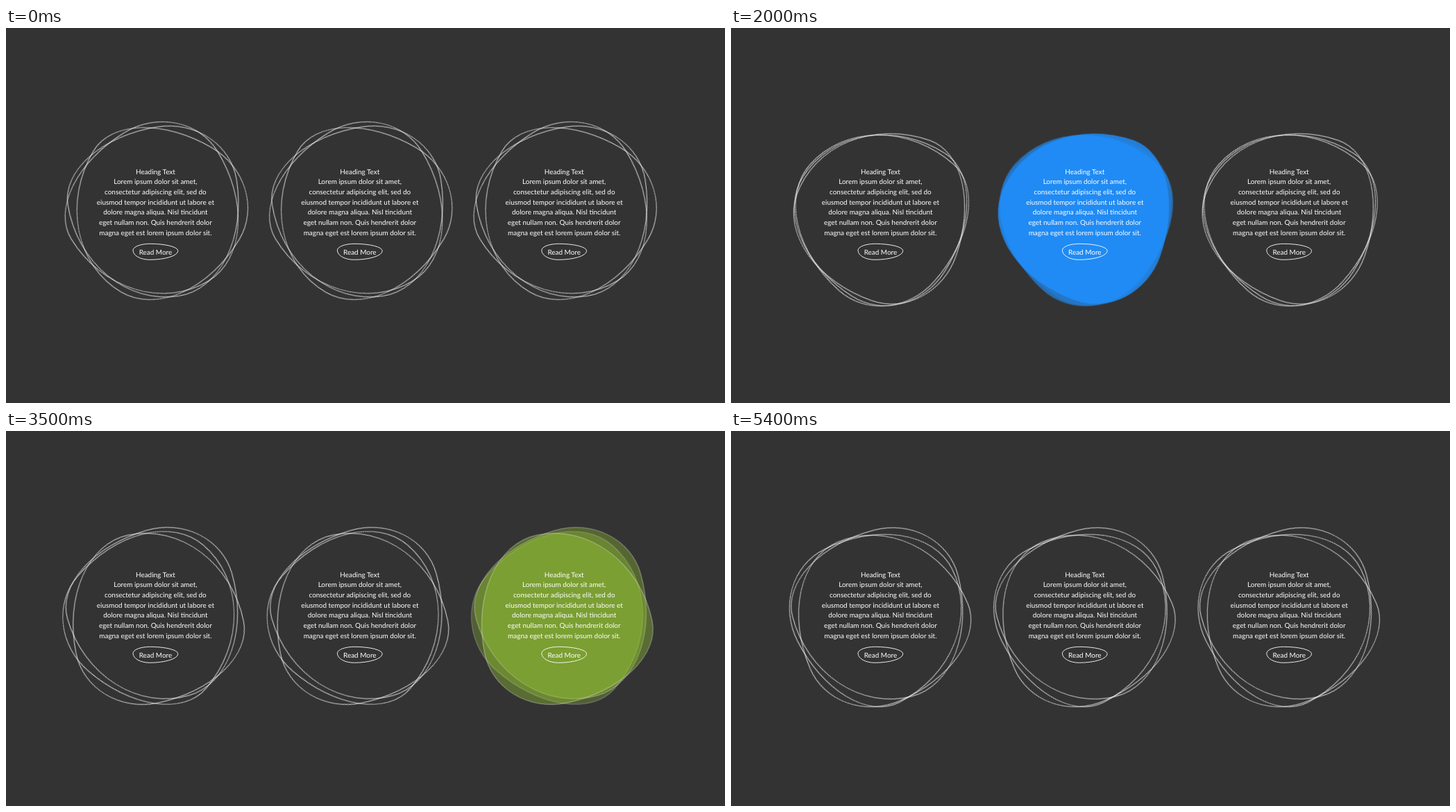
Animation of 1036x541 px, one loop 5500 ms. Source, as an HTML page:

```html
<!DOCTYPE html>
<html lang="en">
<head>
<meta charset="utf-8">
<title>Blob cards</title>
<style>
  html, body { margin: 0; height: 100%; overflow: hidden; background: #333; }
  svg { display: block; width: 1036px; height: 541px; }

  text {
    font: 9.95px Lato, "Open Sans", sans-serif;
    fill: #fff;
    text-anchor: middle;
    text-rendering: geometricPrecision;
  }

  .button { fill: none; stroke: #fff; stroke-width: .9; vector-effect: non-scaling-stroke; }

  .blob {
    fill: var(--color);
    fill-opacity: 0;
    stroke: #fff;
    stroke-width: .82;
    animation: 5.5s steps(55) infinite spin, 5.5s ease infinite;
    animation-name: spin, var(--hover);
  }
  /* three speeds, the second one counter-clockwise */
  .blob:nth-child(1) { --from: 81deg;    --to: 442deg;   --dim: .3; }
  .blob:nth-child(2) { --from: 58.5deg;  --to: -483deg;  --dim: .6; }
  .blob:nth-child(3) { --from: 120.6deg; --to: 337.2deg; --dim: .8; }

  .card:nth-child(1) { --color: #dc143c; --hover: hover1; }
  .card:nth-child(2) { --color: #1e90ff; --hover: hover2; }
  .card:nth-child(3) { --color: #9acd32; --hover: hover3; }

  @keyframes spin {
    from { transform: rotate(var(--from)); }
    to { transform: rotate(var(--to)); }
  }

  /* the outline drops at once on entry and grows back on leaving */
  @keyframes hover1 {
    0%, 16.018% { opacity: 1; fill-opacity: 0; stroke-width: .82; }
    16.019% { stroke-width: 0; }
    24.309%, 26.364% { opacity: var(--dim); fill-opacity: 1; }
    26.364% { stroke-width: 0; }
    34.655%, 100% { opacity: 1; fill-opacity: 0; stroke-width: .82; }
  }
  @keyframes hover2 {
    0%, 27.273% { opacity: 1; fill-opacity: 0; stroke-width: .82; }
    27.274% { stroke-width: 0; }
    35.564%, 42.364% { opacity: var(--dim); fill-opacity: 1; }
    42.364% { stroke-width: 0; }
    50.655%, 100% { opacity: 1; fill-opacity: 0; stroke-width: .82; }
  }
  @keyframes hover3 {
    0%, 43.636% { opacity: 1; fill-opacity: 0; stroke-width: .82; }
    43.637% { stroke-width: 0; }
    51.927%, 60.764% { opacity: var(--dim); fill-opacity: 1; }
    60.764% { stroke-width: 0; }
    69.055%, 100% { opacity: 1; fill-opacity: 0; stroke-width: .82; }
  }
</style>
</head>
<body>
<svg id="stage" viewBox="0 0 1036 541"></svg>
<script>
  const SIZE = 245.8, GAP = 294.4, LINE = 14.74;
  const LINES = [
    "Heading Text",
    "Lorem ipsum dolor sit amet,",
    "consectetur adipiscing elit, sed do",
    "eiusmod tempor incididunt ut labore et",
    "dolore magna aliqua. Nisl tincidunt",
    "eget nullam non. Quis hendrerit dolor",
    "magna eget est lorem ipsum dolor sit."
  ];

  // four elliptical corners around the centre, as fractions of the box
  const px = (...v) => v.map(n => (n * SIZE).toFixed(2)).join(" ");
  const arc = (rx, ry, x, y) => `A${px(rx, ry)} 0 0 1 ${px(x, y)}`;
  const shape = `M${px(-.12, -.5)}` +
    arc(.62, .44, .5, -.06) + arc(.63, .56, -.13, .5) +
    arc(.37, .59, -.5, -.09) + arc(.38, .41, -.12, -.5) + "Z";

  const blob = `<path class="blob" d="${shape}"/>`;
  const label = (s, y) => `<text x="-.1" y="${y.toFixed(2)}">${s}</text>`;
  const card = i => `
    <g class="card" transform="translate(${215.5 + GAP * i} 267.5)">
      ${blob.repeat(3)}
      ${LINES.map((s, n) => label(s, -57 + LINE * n)).join("")}
      <path class="button" d="${shape}" transform="translate(-.1 55.3) scale(.2636 .0936)"/>
      ${label("Read More", 59.4)}
    </g>`;

  document.getElementById("stage").innerHTML = [0, 1, 2].map(card).join("");
</script>
</body>
</html>
```
